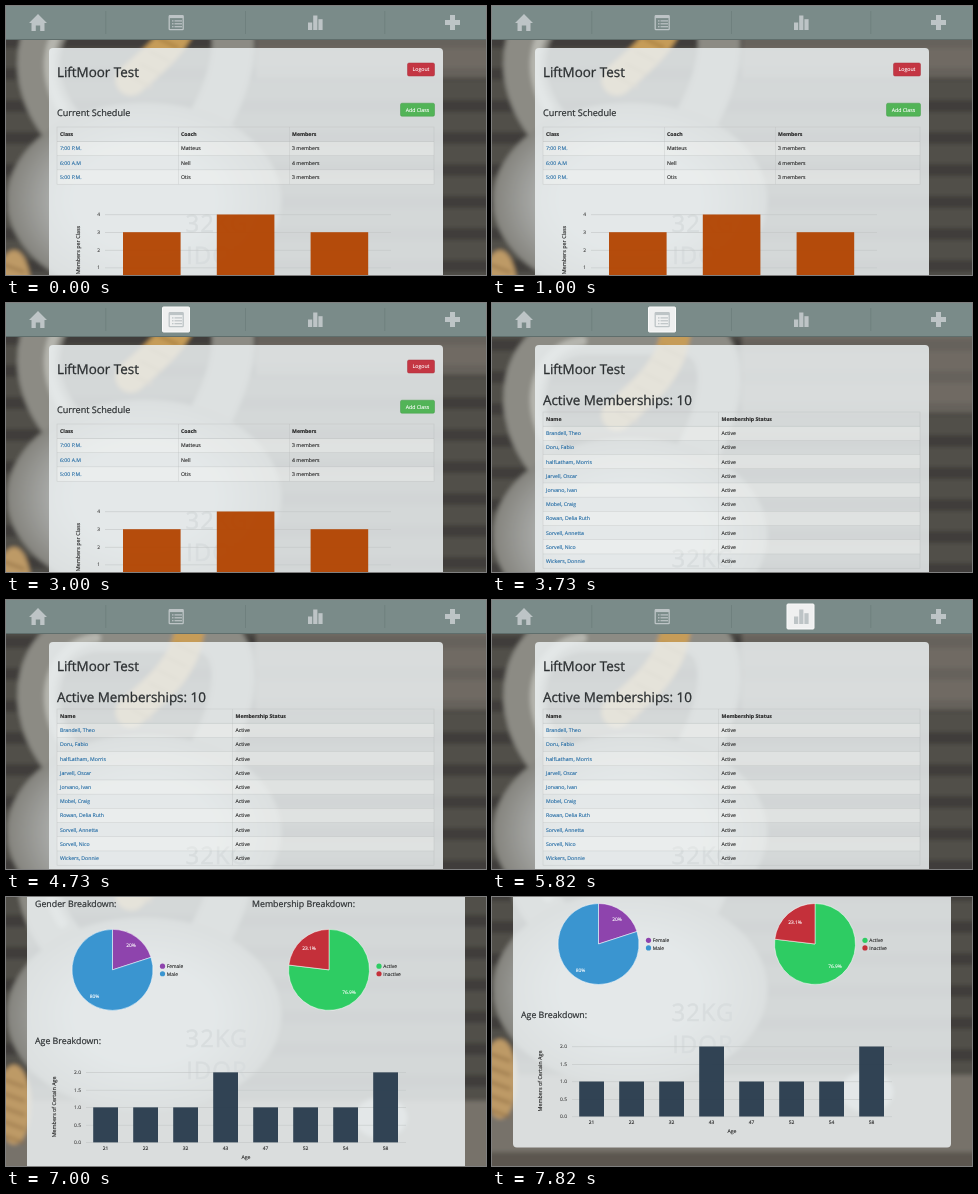
An HTML page for the animation above (8 s loop, 480 by 269 pixels).

```html
<!DOCTYPE html>
<html lang="en">
<head>
<meta charset="utf-8">
<title>Gym dashboard</title>
<style>
  html, body { margin: 0; width: 100%; height: 100%; overflow: hidden; background: #45433f; }
  svg { display: block; width: 480px; height: 269px; }
  text { font-family: "Open Sans", "Noto Sans", sans-serif; text-rendering: geometricPrecision; }
</style>
</head>
<body>
<svg id="stage" viewBox="0 0 480 269"></svg>
<script>
const INK = '#2b2f31', LINK = '#1f69a3', GRID = '#c3c7c7', ICON = '#bdc4c6';

const rect = (x, y, w, h, fill, more = '') =>
  `<rect x="${x}" y="${y}" width="${w}" height="${h}" fill="${fill}" ${more}/>`;
// A hairline stroke gives small lettering a medium weight.
const text = (x, y, size, str, fill = INK, more = '') =>
  `<text x="${x}" y="${y}" font-size="${size}" fill="${fill}" stroke="${fill}" stroke-width="${size * .022}" ${more}>${str}</text>`;
const path = (d, fill, more = '') => `<path d="${d}" fill="${fill}" ${more}/>`;
const oval = (x, y, rx, ry, fill, more = '') =>
  `<ellipse cx="${x}" cy="${y}" rx="${rx}" ry="${ry}" fill="${fill}" ${more}/>`;
const group = (id, body) => `<g id="${id}">${body}</g>`;
const count = (n, draw) => Array.from({ length: n }, (_, i) => draw(i)).join('');
const MIDDLE = 'text-anchor="middle"', END = 'text-anchor="end"';

const title = (x, y, str) => text(x, y, 13.4, str);
const subtitle = (x, y, str, size = 8.8) => text(x, y, size, str);
const card = (x, w, h) => rect(x, 42, w, h, '#ecf0f1', 'rx="4" fill-opacity=".85"');

function photo() {
  const stroke = (d, color, width) =>
    path(d, 'none', `stroke="${color}" stroke-width="${width}" stroke-linecap="round"`);
  const emboss = (y, str) => text(211, y, 24, str, '#6f7274', `${MIDDLE} letter-spacing="1"`);
  return `<g filter="url(#soft)">
    ${rect(-10, -10, 500, 480, '#514f4a')}
    ${count(10, i => rect(-10, 4 + i * 32, 500, 12, '#3f3d3a'))}
    ${rect(250, 28, 240, 82, '#8d877c', 'opacity=".5"')}
    ${rect(-10, 318, 500, 160, '#77726b')}
    ${rect(-10, 395, 500, 60, '#5c5650')}
    ${oval(375, 335, 26, 20, '#b9b9b6')}
    ${stroke('M62 165C10 110 30 30 95 30H185C240 30 235 95 205 150', '#8c8b84', 42)}
    ${stroke('M56 140C30 100 44 45 90 38', '#b5b5ae', 10)}
    ${stroke('M184 28C178 70 150 90 125 112', '#c69c58', 30)}
    ${count(6, i => stroke(`M${170 - i * 9} ${44 + i * 13}l20 10`, '#9d7439', 2))}
    ${oval(138, 232, 137, 97, 'url(#iron)')}
    ${oval(8, 322, 17, 40, '#bd9a66')}
    ${count(5, i => stroke(`M-4 ${296 + i * 14}l22 8`, '#8e6c3f', 2))}
  </g>${emboss(264, '32KG')}${emboss(296, 'IDOR')}`;
}

function nav() {
  const listRow = y => rect(166, y, 1.5, 1.2, ICON) + rect(168.5, y, 7.5, 1.2, ICON);
  const highlight = (id, x) => group(id,
    rect(x, 4, 27, 25, '#eff0f0', 'rx="1" stroke="#fafafa" stroke-width="1"'));
  return rect(0, 0, 480, 33, '#7a8b89') + rect(0, 33, 480, 1, '#5f6e6c') +
    [99.5, 239, 378.5].map(x => rect(x, 5, .7, 23, '#6b7c7a')).join('') +
    highlight('hotList', 156.5) + highlight('hotChart', 295) +
    path('M32 8L41 17H38.5V25H34.2V19.5H29.8V25H25.5V17H23Z', ICON) +
    rect(163.2, 9.7, 14, 14, 'none', `stroke="${ICON}" stroke-width="1.3" rx=".8"`) +
    rect(163.2, 9.5, 14, 2.6, ICON) + [14.3, 17.2, 20.1].map(listRow).join('') +
    rect(302, 16.5, 4.2, 7.5, ICON) + rect(307.2, 9.5, 4.2, 14.5, ICON) + rect(312.4, 13.2, 4.2, 10.8, ICON) +
    path('M444 9h5v5h5v5h-5v5h-5v-5h-5v-5h5Z', ICON);
}

// First row is the bold header; first column holds links.
function table(y, rowH, cols, rows) {
  const x = 51, w = 377, h = rowH * rows.length, line = '#b3b8b8';
  return rows.map((row, i) => {
    const top = y + i * rowH;
    return (i % 2 ? rect(x, top, w, rowH, '#f9f9f6', 'opacity=".3"') : '') +
      (i ? rect(x, top - .3, w, i > 1 ? .5 : .8, line, 'opacity=".55"') : '') +
      row.map((cell, c) => text(cols[c] + 3, top + rowH / 2 + 1.9, 5.2, cell,
        i && !c ? LINK : '#222', i ? '' : 'font-weight="700"')).join('');
  }).join('') +
    cols.slice(1).map(c => rect(c, y, .5, h, line, 'opacity=".55"')).join('') +
    rect(x, y, w, h, 'none', `stroke="${line}" stroke-width=".5" stroke-opacity=".6"`);
}

const button = (x, y, w, label, fill, edge) =>
  rect(x, y, w, 13, fill, `rx="1.5" stroke="${edge}" stroke-width=".5"`) +
  text(x + w / 2, y + 8.4, 5.2, label, '#fff', MIDDLE);

const sideLabel = (x, y, str) =>
  text(0, 0, 5.4, str, '#222', `${MIDDLE} transform="translate(${x} ${y}) rotate(-90)"`);

function schedule() {
  const base = 279.3, step = 17.7;
  const bars = [3, 4, 3].map((n, i) =>
    rect(117 + i * 93.8, base - n * step, 57.6, n * step, '#b34400', 'opacity=".95"')).join('');
  const grid = count(5, n => rect(99, base - n * step, 286, .6, GRID) +
    text(94, base + 1.8 - n * step, 4.9, n, '#444', END));
  return card(43, 394, 330) + title(51, 70.8, 'LiftMoor Test') +
    button(401.5, 57, 27, 'Logout', '#c43643', '#a82f3a') +
    subtitle(51, 109.5, 'Current Schedule', 9.1) +
    button(394.5, 97.2, 34, 'Add Class', '#52b457', '#419a46') +
    table(121, 14.3, [51, 172, 283], [
      ['Class', 'Coach', 'Members'],
      ['7:00 P.M.', 'Matteus', '3 members'],
      ['6:00 A.M', 'Nell', '4 members'],
      ['5:00 P.M.', 'Otis', '3 members']]) +
    grid + bars + sideLabel(73.5, 244, 'Members per Class');
}

function members() {
  const names = ['Brandell, Theo', 'Doru, Fabio', 'halfLatham, Morris', 'Jarvell, Oscar',
    'Jorvano, Ivan', 'Mobel, Craig', 'Rowan, Delia Ruth', 'Sorvell, Annetta',
    'Sorvell, Nico', 'Wickers, Donnie'];
  return card(43, 394, 330) + title(51, 70.8, 'LiftMoor Test') +
    title(51, 101.8, 'Active Memberships: ' + names.length) +
    table(109, 14.2, [51, 226.5],
      [['Name', 'Membership Status'], ...names.map(n => [n, 'Active'])]);
}

function slice(cx, from, to, fill) {
  const cy = 187, r = 40.5;
  const at = f => `${cx + r * Math.sin(f * 2 * Math.PI)} ${cy - r * Math.cos(f * 2 * Math.PI)}`;
  return path(`M${cx} ${cy}L${at(from)}A${r} ${r} 0 ${to - from > .5 ? 1 : 0} 1 ${at(to)}Z`,
    fill, 'stroke="#fff" stroke-width=".5"');
}

const pie = (cx, share, entries) =>
  slice(cx, 0, share, entries[0].color) + slice(cx, share, 1, entries[1].color) +
  entries.map((e, i) => text(e.x, e.y + 1.8, 4.9, e.part, '#fff', MIDDLE) +
    oval(cx + 50, 183.3 + i * 7.6, 2.6, 2.6, e.color) +
    text(cx + 54.3, 185.1 + i * 7.6, 4.9, e.name, '#222')).join('');

function stats() {
  const ages = [21, 22, 32, 43, 47, 52, 54, 58], base = 359.5;
  const grid = count(5, i => rect(80, base - i * 17.5, 320, .6, GRID) +
    text(75, base + 1.8 - i * 17.5, 4.9, (i / 2).toFixed(1), '#444', END));
  const bars = ages.map((age, i) => {
    const h = age === 43 || age === 58 ? 70 : 35;
    return rect(87.2 + i * 40, base - h, 24.8, h, '#2c3e50', 'opacity=".97"') +
      text(99.6 + i * 40, 367, 4.9, age, '#222', MIDDLE);
  }).join('');
  return card(21, 438, 348.5) + title(29, 71.3, 'LiftMoor Test') +
    title(29, 102.3, 'Active Membership Data') +
    subtitle(29, 124.5, 'Gender Breakdown:') + subtitle(246, 124.5, 'Membership Breakdown:') +
    pie(106.5, .2, [
      { name: 'Female', part: '20%', color: '#8e44ad', x: 125, y: 162 },
      { name: 'Male', part: '80%', color: '#3a95d0', x: 88.5, y: 213 }]) +
    pie(323, .769, [
      { name: 'Active', part: '76.9%', color: '#2ecc63', x: 343, y: 209.5 },
      { name: 'Inactive', part: '23.1%', color: '#c4303a', x: 303, y: 165 }]) +
    subtitle(29, 261, 'Age Breakdown:') + grid + bars +
    sideLabel(50, 324, 'Members of Certain Age') + text(240, 376.3, 5.2, 'Age', '#222', MIDDLE);
}

const $ = id => document.getElementById(id);
$('stage').innerHTML =
  `<defs>
    <filter id="soft" x="0" y="0" width="1" height="1"><feGaussianBlur stdDeviation="2.2"/></filter>
    <radialGradient id="iron"><stop offset=".5" stop-color="#bcbfbf"/><stop offset="1" stop-color="#84837d"/></radialGradient>
  </defs>` +
  group('world', group('photo', photo()) + group('schedule', schedule()) +
    group('members', members()) + group('stats', stats()) + group('nav', nav()));

const LOOP = 8000, TO_MEMBERS = 3360, TO_STATS = 6270;
const SCROLL = [[6640, 0], [6730, 26], [6820, 58], [6910, 90], [7000, 114],
  [7090, 126], [7180, 133], [7360, 138], [7550, 140]];

function scrollAt(t) {
  const i = SCROLL.findIndex(([time]) => time > t);
  if (i === 0) return 0;
  if (i < 0) return SCROLL[SCROLL.length - 1][1];
  const [t0, y0] = SCROLL[i - 1], [t1, y1] = SCROLL[i];
  return y0 + (y1 - y0) * (t - t0) / (t1 - t0);
}

const show = (id, on) => $(id).setAttribute('visibility', on ? 'visible' : 'hidden');

function draw(now) {
  const t = now % LOOP;
  show('schedule', t < TO_MEMBERS);
  show('members', t >= TO_MEMBERS && t < TO_STATS);
  show('stats', t >= TO_STATS);
  show('hotList', t >= 1990 && t < 4080);
  show('hotChart', t >= 5630 && t < 6540);
  $('photo').setAttribute('transform', `translate(0 ${t < TO_MEMBERS ? -38 : 0})`);
  $('world').setAttribute('transform', `translate(0 ${-scrollAt(t)})`);
}

const start = performance.now();
(function tick() {
  draw(performance.now() - start);
  requestAnimationFrame(tick);
})();
</script>
</body>
</html>
```
